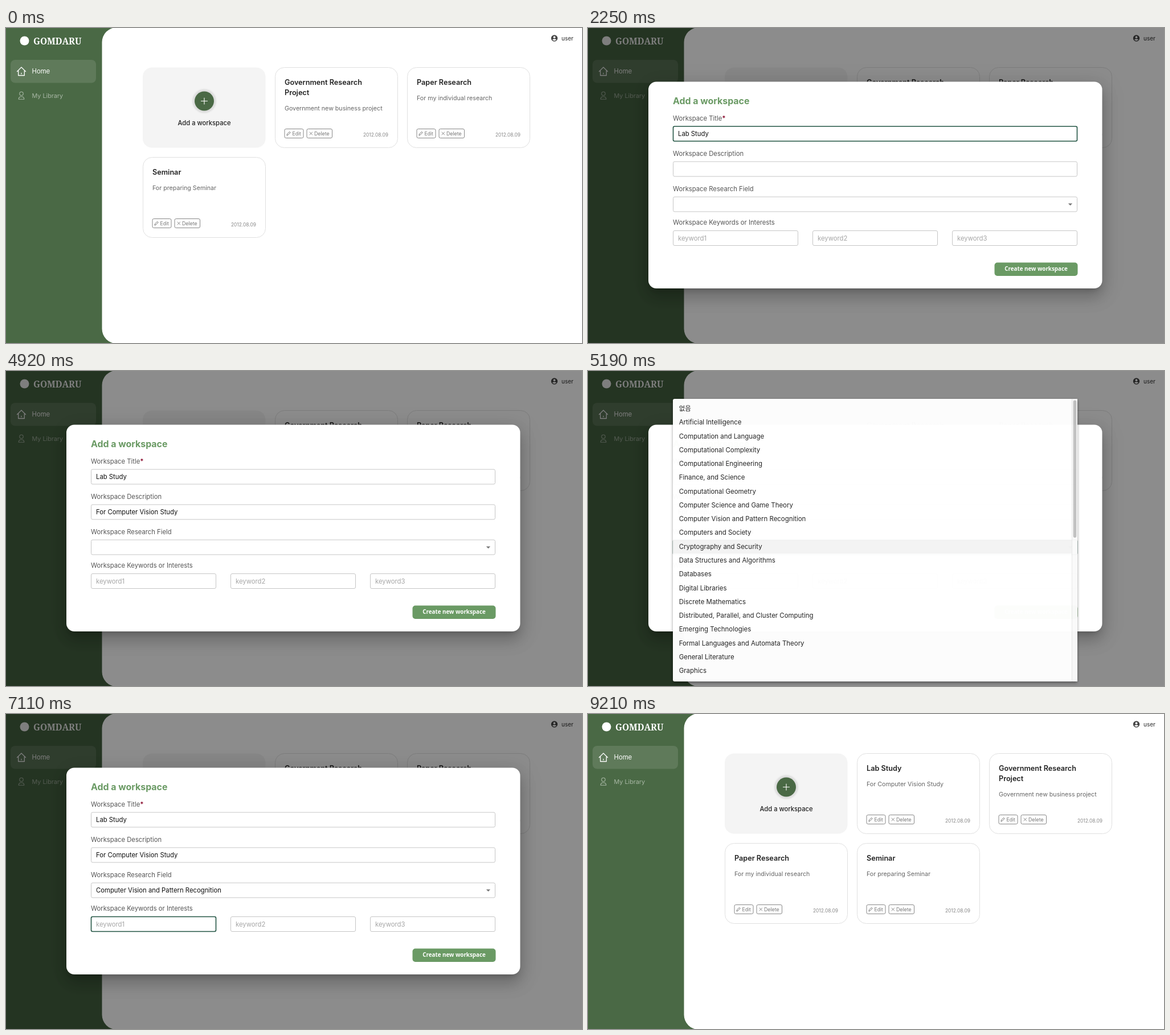
An HTML page that plays this animation: 1011 px wide and 554 px high, repeating every 9.9 s.

```html
<!DOCTYPE html>
<html lang="en">
<head>
<meta charset="utf-8">
<title>Workspaces</title>
<style>
  html, body { margin: 0; width: 100%; height: 100%; overflow: hidden; background: #fff; }
  svg { display: block; width: 100%; height: 100%; }
  text { font-family: Inter, "Noto Sans CJK KR", "Noto Sans", sans-serif; white-space: pre; }
  .brand { font: 700 15.5px "Noto Serif", serif; fill: #fff; }
  .create { font: 600 9.8px "Noto Sans", sans-serif; fill: #fff; }
  .line { fill: none; stroke-linecap: round; stroke-linejoin: round; }
</style>
</head>
<body>
<svg id="stage" viewBox="0 0 1011 554" preserveAspectRatio="none"></svg>
<script>
const LOOP = 9900;
const GREEN = '#4a6945';
const svg = document.getElementById('stage');

const text = (x, y, size, fill, str, extra = '') =>
  `<text x="${x}" y="${y}" font-size="${size}" fill="${fill}" ${extra}>${str}</text>`;
const rect = (x, y, w, h, r, fill, extra = '') =>
  `<rect x="${x}" y="${y}" width="${w}" height="${h}" rx="${r}" fill="${fill}" ${extra}/>`;
const line = (d, stroke, width) =>
  `<path class="line" d="${d}" stroke="${stroke}" stroke-width="${width}"/>`;
const blur = (id, deviation) =>
  `<filter id="${id}" x="-20%" y="-20%" width="140%" height="140%"><feGaussianBlur stdDeviation="${deviation}"/></filter>`;

// Blurred copy of a box, moved down and grown like a CSS box-shadow.
const shadow = (x, y, w, h, r, dy, grow, alpha, filter) =>
  rect(x - grow, y - grow + dy, w + 2 * grow, h + 2 * grow, Math.max(0, r + grow), '#000',
    `fill-opacity="${alpha}" filter="url(#${filter})"`);

const PROJECTS = {
  lab: [['Lab Study'], 'For Computer Vision Study'],
  gov: [['Government Research', 'Project'], 'Government new business project'],
  paper: [['Paper Research'], 'For my individual research'],
  seminar: [['Seminar'], 'For preparing Seminar']
};

function card(key, slot) {
  const [title, note] = PROJECTS[key];
  const x = 240 + 232 * (slot % 3), y = 69.5 + 158 * Math.floor(slot / 3);
  const grey = '#777';
  return `<g transform="translate(${x} ${y})">` +
    rect(.5, 0, 215, 141, 16, '#fff', 'stroke="#e0e0e0"') +
    title.map((row, i) => text(17, 30.5 + 18 * i, 12.65, '#222', row, 'font-weight="600"')).join('') +
    text(17, 57 + 18 * (title.length - 1), 10.65, '#666', note) +
    rect(17, 108, 33, 16, 2.5, 'none', 'stroke="#888"') +
    line('M21 119l.6-2.2 4-4 1.6 1.6-4 4z', '#666', .9) +
    text(30.5, 119.2, 8.6, grey, 'Edit') +
    rect(56, 108, 44.5, 16, 2.5, 'none', 'stroke="#888"') +
    line('M61 113.7l4.6 4.6M65.6 113.7l-4.6 4.6', '#777', .9) +
    text(69, 119.2, 8.8, grey, 'Delete') +
    text(199, 121.5, 8.4, '#888', '2012.08.09', 'text-anchor="end"') + '</g>';
}

const sidebar =
  `<circle cx="32.5" cy="22.5" r="8" fill="#fff"/><text class="brand" x="48" y="28.5">GOMDARU</text>` +
  rect(8, 56, 150, 40.5, 8, '#5f7a5a') +
  line('M19.5 76.5L27 69l7.5 7.5M21.7 75v8.5h10.6V75M27 79.2v1.6', '#fff', 1.3) +
  text(45.5, 80, 11.3, '#fff', 'Home') +
  `<circle class="line" cx="27" cy="115.5" r="3.2" stroke="#a9b8a6" stroke-width="1.1"/>` +
  line('M22.2 125.2c0-3.4 1.6-4.4 4.8-4.4s4.8 1 4.8 4.4z', '#a9b8a6', 1.1) +
  text(45.5, 123, 10.8, '#a9b8a6', 'My Library');

const page =
  rect(0, 0, 1011, 554, 0, GREEN) + sidebar +
  '<rect id="shade" width="200" height="554"/>' +
  `<path d="M1011 -1H194.5A26 26 0 0 0 168.5 25V529A26 26 0 0 0 194.5 555H1011Z" fill="#fff"/>` +
  `<circle cx="962.5" cy="18" r="5.7" fill="#444"/><circle cx="962.5" cy="16.2" r="1.9" fill="#fff"/>
   <path d="M958.9 20.6q3.6-2.6 7.2 0q-3.6 3.6-7.2 0" fill="#fff"/>` +
  text(975, 21.7, 9.8, '#444', 'user', 'font-weight="500"') +
  rect(240, 69.5, 215.5, 141, 16, '#f4f4f4') +
  `<circle cx="348" cy="128.5" r="21" fill="#000" fill-opacity=".09" filter="url(#halo)"/>
   <circle id="plus" cx="348" cy="128.5" r="17"/>` +
  line('M342.5 128.5h11M348 123v11', '#fff', 1.1) +
  text(348, 170.7, 11.2, '#222', 'Add a workspace', 'text-anchor="middle" font-weight="500"') +
  `<g id="before">${card('gov', 1)}${card('paper', 2)}${card('seminar', 3)}</g>
   <g id="after">${card('lab', 1)}${card('gov', 2)}${card('paper', 3)}${card('seminar', 4)}</g>`;

// focus and caret are [from, to] spans in ms; keys are [time, characters typed].
const FIELDS = [
  { x: 149, y: 173, w: 710, value: 'Lab Study', focus: [1050, 2310],
    caret: [[1050, 1290], [1500, 2250]], keys: [[1500, 1], [2010, 9]] },
  { x: 149, y: 235, w: 710, value: 'For Computer Vision Study', focus: [2310, 4800],
    caret: [[2400, 2640], [2850, 4740]],
    keys: [[3060, 1], [3240, 4], [3390, 5], [4290, 21], [4410, 22], [4500, 25]] },
  { x: 149, y: 297, w: 710, value: 'Computer Vision and Pattern Recognition',
    focus: [4980, 6780], caret: [], keys: [[6480, 39]] },
  { x: 149, y: 356.5, w: 220, value: 'CV', hint: 'keyword1', focus: [6840, 7560],
    caret: [[6900, 7110], [7260, 7530]], keys: [[7260, 1], [7320, 2]] },
  { x: 394, y: 356.5, w: 220, value: 'AI', hint: 'keyword2', focus: [7560, 8250],
    caret: [[7620, 7800], [7860, 8190]], keys: [[7860, 1], [7980, 2]] },
  { x: 639, y: 356.5, w: 220, value: '', hint: 'keyword3', focus: [8250, 8900],
    caret: [[8310, 8430]], keys: [] }
];

const fieldMarkup = f => `<g class="field">` +
  rect(f.x + .5, f.y, f.w - 1, 26, 2.5, '#fff') +
  text(f.x + 9, f.y + 17, 11.3, '#111', '') +
  rect(f.x + 9, f.y + 5, 1, 16, 0, '#000') + '</g>';

const label = (y, str) => text(149, y, 11.25, '#555', str);
const paper = [106, 94.5, 796.5, 363.5, 14];
const dialog =
  shadow(...paper, 7.5, -5, .2, 'blur5') +
  shadow(...paper, 16.5, 2, .14, 'blur13') +
  shadow(...paper, 6, 5.5, .12, 'blur16') +
  rect(...paper, '#fff') +
  text(149, 133.5, 15.9, '#6a9a64', 'Add a workspace', 'font-weight="700"') +
  label(162.5, 'Workspace Title<tspan fill="#8a1030" font-weight="700">*</tspan>') +
  label(224.5, 'Workspace Description') +
  label(286.5, 'Workspace Research Field') +
  label(346, 'Workspace Keywords or Interests') +
  FIELDS.map(fieldMarkup).join('') +
  '<path d="M842.8 308.5h7.4l-3.7 3.7z" fill="#777"/>' +
  rect(713.5, 412.5, 146, 23.5, 5, '#6a9a64') +
  '<text class="create" x="786.5" y="427" text-anchor="middle">Create new workspace</text>';

const TOPICS = ['없음', 'Artificial Intelligence', 'Computation and Language', 'Computational Complexity',
  'Computational Engineering', 'Finance, and Science', 'Computational Geometry',
  'Computer Science and Game Theory', 'Computer Vision and Pattern Recognition', 'Computers and Society',
  'Cryptography and Security', 'Data Structures and Algorithms', 'Databases', 'Digital Libraries',
  'Discrete Mathematics', 'Distributed, Parallel, and Cluster Computing', 'Emerging Technologies',
  'Formal Languages and Automata Theory', 'General Literature', 'Graphics'];

const menu =
  shadow(149, 49, 710, 497, 3, 2, 0, .4, 'soft') +
  rect(149, 49, 710, 497, 3, '#fff') +
  rect(149, 297, 700, 24.3, 0, '#f3f3f3') +
  TOPICS.map((topic, i) => text(159.7, 70 + 24.27 * i, 11.45, '#222', topic)).join('') +
  rect(849, 49, 10, 497, 0, '#fafafa') + rect(849, 49, 1, 497, 0, '#e8e8e8') +
  rect(851.7, 51.5, 5.6, 241.5, 2.8, '#c1c1c1');

svg.innerHTML =
  `<defs>${blur('halo', 1.3)}${blur('soft', 2.5)}${blur('blur5', 5)}${blur('blur13', 13)}${blur('blur16', 16)}</defs>` +
  page +
  `<rect id="backdrop" width="1011" height="554"/><g id="dialog">${dialog}</g><g id="menu">${menu}</g>`;

const part = Object.fromEntries(['plus', 'before', 'after', 'shade', 'backdrop', 'dialog', 'menu']
  .map(id => [id, document.getElementById(id)]));
const fieldNodes = [...svg.querySelectorAll('.field')].map(g => g.children);

const clamp = v => Math.min(1, Math.max(0, v));
const easeOut = v => 1 - (1 - clamp(v)) ** 2;
const within = (t, [from, to]) => t >= from && t < to;
const show = (node, on) => node.setAttribute('display', on ? 'inline' : 'none');

function typedCount(keys, t) {
  if (!keys.length || t < keys[0][0]) return 0;
  for (let i = 1; i < keys.length; i++) {
    const [t0, n0] = keys[i - 1], [t1, n1] = keys[i];
    if (t < t1) return Math.floor(n0 + (n1 - n0) * (t - t0) / (t1 - t0) + .001);
  }
  return keys[keys.length - 1][1];
}

function drawField(f, [box, label, caret], t) {
  const typed = f.value.slice(0, typedCount(f.keys, t));
  const focused = within(t, f.focus);
  box.setAttribute('stroke', focused ? '#225443' : '#c6c6c6');
  box.setAttribute('stroke-width', focused ? 1.6 : 1);
  label.textContent = typed || f.hint || '';
  label.setAttribute('fill', typed ? '#111' : '#a6a6a6');
  const on = f.caret.some(span => within(t, span));
  show(caret, on);
  if (on) caret.setAttribute('x', f.x + 9 + (typed ? label.getComputedTextLength() : 0));
}

function draw(t) {
  const opening = easeOut((t - 780) / 270);
  const closing = 1 - clamp((t - 8540) / 280);
  const open = t >= 780 && closing > 0;
  part.plus.setAttribute('fill', within(t, [600, 780]) ? '#3f5c3b' : GREEN);
  show(part.before, t < 9210);
  show(part.after, t >= 9210);
  show(part.backdrop, open);
  show(part.dialog, open);
  part.shade.setAttribute('opacity', .1 * opening * closing);
  part.backdrop.setAttribute('opacity', (.23 + .22 * opening) * closing);
  part.dialog.setAttribute('opacity', closing);
  if (open) FIELDS.forEach((f, i) => drawField(f, fieldNodes[i], t));

  const grow = easeOut((t - 4980) / 245);
  const fade = 1 - clamp((t - 6450) / 180);
  show(part.menu, grow * fade > 0);
  part.menu.setAttribute('opacity', grow * fade);
  const spread = clamp(grow * 1.05);
  const sx = .75 + .25 * spread, sy = .5625 + .4375 * spread;
  part.menu.setAttribute('transform', `translate(504 309) scale(${sx} ${sy}) translate(-504 -309)`);
}

const start = performance.now();
function tick() {
  draw((performance.now() - start) % LOOP);
  requestAnimationFrame(tick);
}
tick();
</script>
</body>
</html>
```
